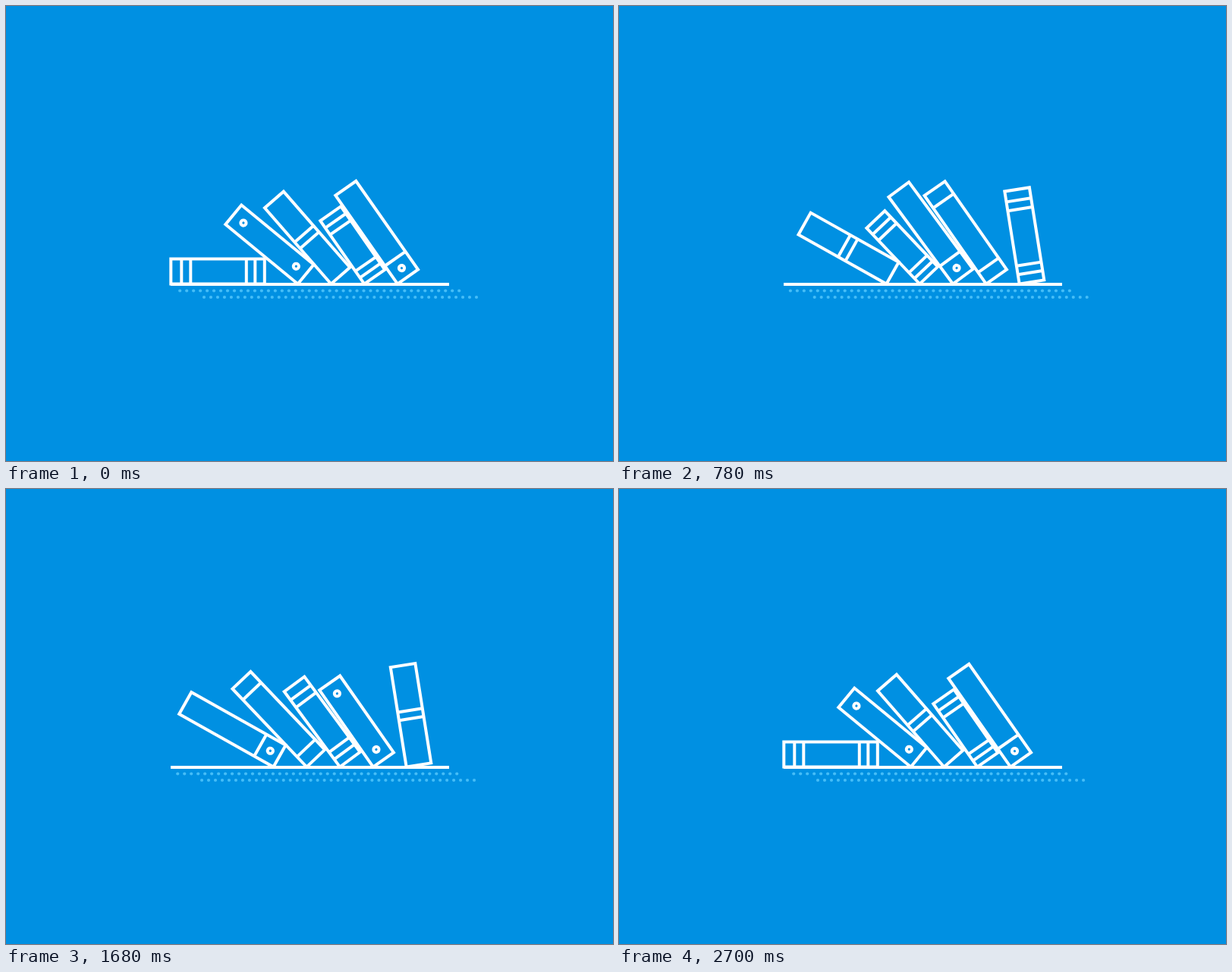
These frames come from a looping animation (800 by 600 pixels, 2.73 s). An HTML page with a canvas:

```html
<!DOCTYPE html>
<html lang="en">
<head>
<meta charset="utf-8">
<title>Bookshelf loader</title>
<style>
  html, body { margin: 0; width: 100%; height: 100%; overflow: hidden; background: #0090e2; }
  canvas { display: block; }
</style>
</head>
<body>
<canvas id="stage" width="800" height="600"></canvas>
<script>
const ctx = document.getElementById('stage').getContext('2d');
const LOOP = 2730, STEP = 30, BEAT = 450, LIFE = 6 * BEAT;
const WIDTH = 33, FLOOR = 366.5;

// In order of entry; bands and rings are heights above the foot of the book
const books = [
  { height: 142, bands: [18.5, 122], rings: [] },
  { height: 123.5, bands: [12.5, 24, 97.5, 109.5], rings: [] },
  { height: 123.5, bands: [], rings: [16.5, 106.5] },
  { height: 133, bands: [62, 73], rings: [] },
  { height: 101.5, bands: [10, 20.5, 79, 90], rings: [] },
  { height: 142.5, bands: [29], rings: [14] }
];
const leans = [0, 35, 34.8, 41.1, 50.5, 90, 90];

const clamp = v => Math.min(1, Math.max(0, v));

function leanAt(age) {
  const beat = Math.floor(age / BEAT);
  const fall = clamp((age - beat * BEAT - 150) / 300) ** 2.65;
  return (leans[beat] + (leans[beat + 1] - leans[beat]) * fall) * Math.PI / 180;
}

// Springs up from the shelf, overshoots, then settles
function stretchAt(age) {
  if (age < 160) return 1.063 * Math.sin(clamp((age - 92) / 68) * Math.PI / 2);
  return 1 + 0.0315 * (1 + Math.cos(clamp((age - 160) / 85) * Math.PI));
}

function trimmed(points, length, part) {
  ctx.setLineDash(part < 1 ? [part * length, length * 2] : []);
  ctx.beginPath();
  points.forEach(([x, y]) => ctx.lineTo(x, y));
  if (points.length > 2) ctx.closePath();
  ctx.stroke();
}

function drawBook({ height, bands, rings }, age) {
  const stretch = stretchAt(age);
  const part = 1 - clamp((age - 5 * BEAT - 102) / 167);
  if (stretch <= 0 || part <= 0) return;
  const top = -height * stretch;
  ctx.save();
  ctx.translate(559.8 - 43.8 * age / BEAT, FLOOR);
  ctx.rotate(-leanAt(age));
  trimmed([[WIDTH, 0], [WIDTH, top], [0, top], [0, 0]], 2 * (WIDTH - top), part);
  for (const b of bands) trimmed([[WIDTH, -b * stretch], [0, -b * stretch]], WIDTH, part);
  ctx.setLineDash([]);
  for (const r of rings) {
    ctx.beginPath();
    ctx.arc(WIDTH / 2, -r * stretch, 3.6, 0, -2 * Math.PI * part, true);
    ctx.stroke();
  }
  ctx.restore();
}

function drawDots(start, left, right, y, time) {
  const gap = 8.975;
  const shift = (start - left + time * 0.0303) % gap;
  for (let x = left + shift; x <= right; x += gap) {
    ctx.beginPath();
    ctx.arc(x, y, 2.1, 0, 2 * Math.PI);
    ctx.fill();
  }
}

function draw(time) {
  ctx.fillStyle = '#0090e2';
  ctx.fillRect(0, 0, 800, 600);
  ctx.fillStyle = '#45bdf7';
  drawDots(229.2, 223.5, 597.8, 375.5, time);
  drawDots(261, 255, 620.3, 384, time);
  ctx.strokeStyle = ctx.fillStyle = '#fff';
  ctx.lineWidth = 4;
  ctx.fillRect(217, 365, 367, 4);
  books.forEach((book, i) => drawBook(book, (time - i * BEAT + LIFE) % LIFE));
}

const begin = performance.now();
function tick() {
  const time = (performance.now() - begin) % LOOP;
  draw(Math.floor(time / STEP) * STEP);
  requestAnimationFrame(tick);
}
tick();
</script>
</body>
</html>
```
